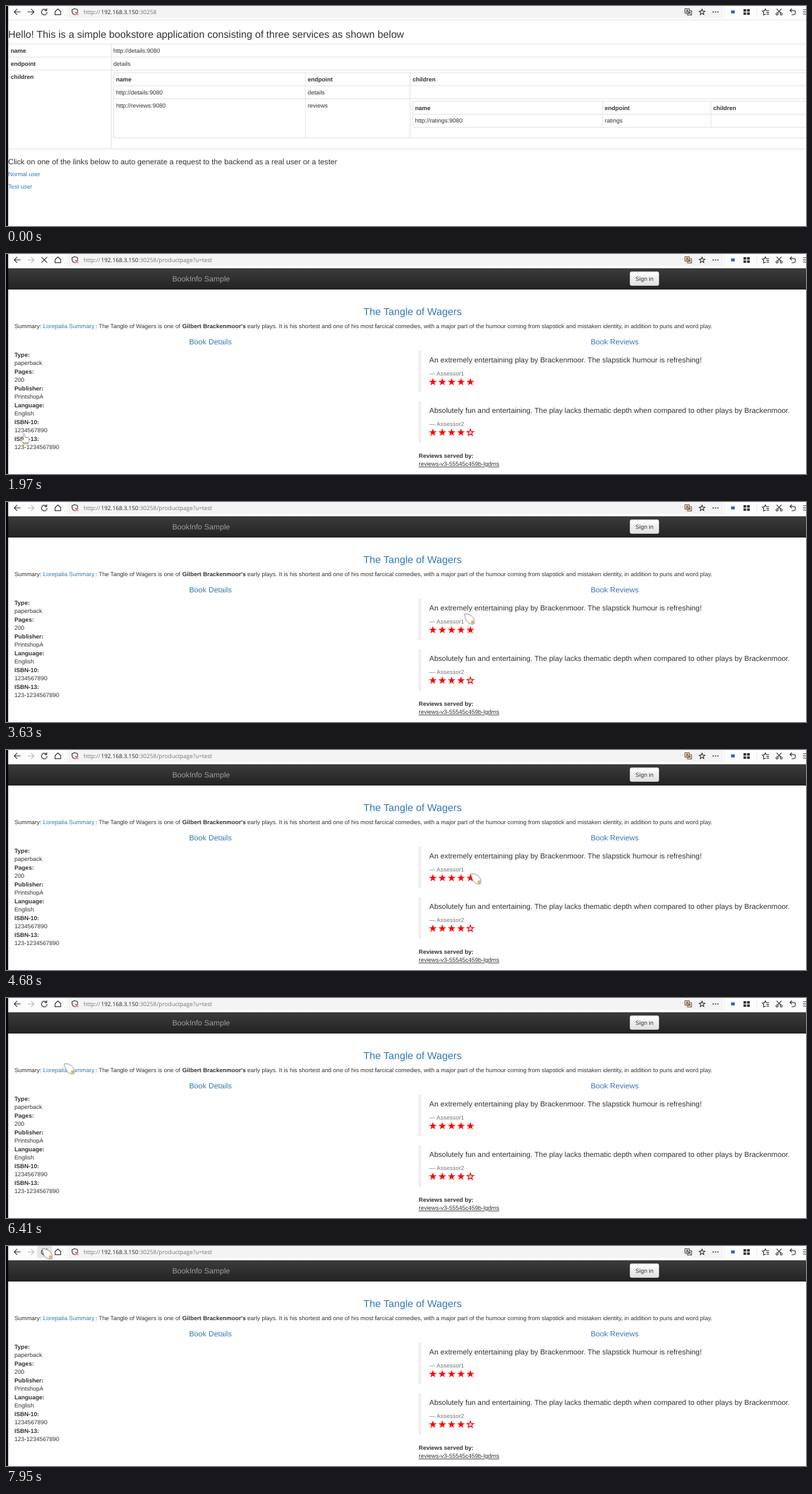
These frames come from a looping animation (1280x353 px, 8 s). An HTML page:

```html
<!DOCTYPE html>
<html lang="en">
<head>
<meta charset="utf-8">
<title>Bookstore walkthrough</title>
<style>
  html, body { margin: 0; width: 100%; height: 100%; overflow: hidden; background: #fff; }
  svg { display: block; }
  text {
    font: 9.47px "Liberation Sans", Arial, sans-serif;
    fill: #333; white-space: pre; text-rendering: geometricPrecision;
  }
  .h3 { font-size: 16.18px; }
  .h4 { font-size: 12.14px; }
  .quote { font-size: 11.79px; }
  .bold { font-weight: bold; }
  .link { fill: #337ab7; }
  .muted { fill: #777; }
  .brand { fill: #9d9d9d; }
  .under { text-decoration: underline; }
  .url text { font: 9.2px "Open Sans", "Noto Sans", sans-serif; fill: #777; }
  .url .host { fill: #222; }
  .grid { fill: none; stroke: #ddd; stroke-width: .9; }
  .icons { fill: none; stroke: #333; stroke-width: 1.2; stroke-linecap: round; stroke-linejoin: round; }

  /* one loop = 8 s, so 1% = 80 ms */
  .cut { animation: 8s step-end infinite; }
  .home { animation-name: home; }
  .product { animation-name: product; }
  .loading { animation-name: loading; }
  .idle { animation-name: idle; }
  .forward { animation-name: forward; }
  .translate { animation-name: translate; }
  .hover { animation-name: hover; }
  .test { animation-name: test; }
  .hand { animation-name: hand; }
  .arrow { animation-name: arrow; }
  .pointer { animation: travel 8s linear infinite; }

  @keyframes home { 0% { visibility: visible } 21.375%, 100% { visibility: hidden } }
  @keyframes product { 0% { visibility: hidden } 21.375%, 100% { visibility: visible } }
  @keyframes loading { 0% { visibility: hidden } 21.375% { visibility: visible } 29%, 100% { visibility: hidden } }
  @keyframes idle { 0% { visibility: visible } 21.375% { visibility: hidden } 29%, 100% { visibility: visible } }
  @keyframes forward { 0% { stroke: #333 } 21.375%, 100% { stroke: #bbb } }
  @keyframes translate { 0% { stroke: #444; fill: #ddd } 21.375% { stroke: #6b5138; fill: #e3d3c0 } 96.75%, 100% { stroke: #444; fill: #ddd } }
  @keyframes hover { 0% { visibility: hidden } 90%, 100% { visibility: visible } }
  @keyframes test { 0% { fill: #337ab7; text-decoration: none } 12.875%, 100% { fill: #23527c; text-decoration: underline } }
  @keyframes hand { 0% { visibility: hidden } 12.875% { visibility: visible } 25.5%, 100% { visibility: hidden } }
  @keyframes arrow { 0% { visibility: visible } 12.875% { visibility: hidden } 25.5%, 100% { visibility: visible } }
  @keyframes travel {
    0%, 1.62% { transform: translate(1300px, 300px) }
    1.625% { transform: translate(1262px, 268px) }
    3.75% { transform: translate(1060px, 272px) }
    6.875% { transform: translate(520px, 320px) }
    8.125% { transform: translate(335px, 328px) }
    10% { transform: translate(80px, 310px) }
    11.125% { transform: translate(36px, 295px) }
    14.625%, 25.5% { transform: translate(27px, 288px) }
    28.125% { transform: translate(220px, 262px) }
    30.625% { transform: translate(482px, 222px) }
    41% { transform: translate(661px, 203px) }
    45.375% { transform: translate(732px, 179px) }
    48.75% { transform: translate(870px, 150px) }
    51.5% { transform: translate(955px, 130px) }
    53.1% { transform: translate(979px, 140px) }
    58.5% { transform: translate(743px, 198px) }
    62%, 66.375% { transform: translate(736px, 204px) }
    71.25% { transform: translate(790px, 300px) }
    72.5% { transform: translate(808px, 318px) }
    75.875% { transform: translate(811px, 267px) }
    77.5% { transform: translate(912px, 200px) }
    80.125% { transform: translate(93px, 105px) }
    82% { transform: translate(5px, 70px) }
    86.25% { transform: translate(49px, 21px) }
    90% { transform: translate(62px, 8px) }
    92.5%, 100% { transform: translate(57px, 4px) }
  }
</style>
</head>
<body>
<svg width="1280" height="353" viewBox="0 0 1280 353">
  <defs>
    <linearGradient id="bar" x2="0" y2="1"><stop stop-color="#3c3c3c"/><stop offset="1" stop-color="#222"/></linearGradient>
    <linearGradient id="button" x2="0" y2="1"><stop stop-color="#fff"/><stop offset="1" stop-color="#e0e0e0"/></linearGradient>
    <path id="star" d="M0-6.4 1.5-2H6.2L2.4.8 3.8 5.3 0 2.5-3.8 5.3-2.4.8-6.2-2H-1.5Z"/>
  </defs>
  <rect width="1280" height="353" fill="#fff"/>

  <g class="home cut">
    <path class="grid" d="M3 61.1H1280M3 82H1280M3 102.9H1280M3 229.2H1280M168.3 61V229
      M1280 107H172.3V211.7H1280M172 127.9H1280M172 148.8H1280M478.9 107V211.7M646.6 107V211.7
      M1280 152.8H650.8V194.6H1280M651 173.7H1280M954.8 153V194.6M1127.8 153V194.6"/>
    <text class="h3" x="3.4" y="50.7">Hello! This is a simple bookstore application consisting of three services as shown below</text>
    <g class="bold">
      <text class="bold" x="7.5" y="74.8">name</text>
      <text class="bold" x="7.5" y="95.7">endpoint</text>
      <text class="bold" x="7.5" y="116.6">children</text>
      <text class="bold" x="176" y="120.7">name</text>
      <text class="bold" x="482.7" y="120.7">endpoint</text>
      <text class="bold" x="650.4" y="120.7">children</text>
      <text class="bold" x="654.5" y="166.5">name</text>
      <text class="bold" x="958" y="166.5">endpoint</text>
      <text class="bold" x="1131.5" y="166.5">children</text>
    </g>
    <text x="171.8" y="74.8">http://details:9080</text>
    <text x="171.8" y="95.7">details</text>
    <text x="176" y="141.6">http://details:9080</text>
    <text x="482.7" y="141.6">details</text>
    <text x="176" y="162.5">http://reviews:9080</text>
    <text x="482.7" y="162.5">reviews</text>
    <text x="654.5" y="187.4">http://ratings:9080</text>
    <text x="958" y="187.4">ratings</text>
    <text class="h4" x="3.4" y="253.6">Click on one of the links below to auto generate a request to the backend as a real user or a tester</text>
    <text class="link" x="3.4" y="272.9">Normal user</text>
    <text class="link test cut" x="3.4" y="293.1">Test user</text>
  </g>

  <g class="product cut">
    <rect y="23" width="1280" height="34" fill="url(#bar)"/>
    <text class="h4 brand" x="266" y="44">BookInfo Sample</text>
    <rect x="998.5" y="28.5" width="46" height="22" rx="2.5" fill="url(#button)" stroke="#ccc"/>
    <text x="1007" y="43">Sign in</text>

    <text class="h3 link" x="650.5" y="98.3" text-anchor="middle">The Tangle of Wagers</text>
    <text x="13.5" y="118.5">Summary: <tspan class="link">Lorepalia Summary</tspan></text>
    <text x="278.8" y="118.5" text-anchor="end">: The Tangle of Wagers is one of</text>
    <text class="bold" x="282" y="118.5">Gilbert Brackenmoor's</text>
    <text x="386" y="118.5">early plays. It is his shortest and one of his most farcical comedies, with a major part of the humour coming from slapstick and mistaken identity, in addition to puns and word play.</text>
    <text class="h4 link" x="293" y="145.4">Book Details</text>
    <text class="h4 link" x="935.5" y="145.4">Book Reviews</text>
    <g id="details"></g>

    <path d="M660 155h4v67h-4zM660 236h4v67h-4z" fill="#eee"/>
    <text class="quote" x="677.3" y="174">An extremely entertaining play by Brackenmoor. The slapstick humour is refreshing!</text>
    <text class="muted" x="677.3" y="195.3">— Assessor1</text>
    <text class="quote" x="677.3" y="255">Absolutely fun and entertaining. The play lacks thematic depth when compared to other plays by Brackenmoor.</text>
    <text class="muted" x="677.3" y="276.3">— Assessor2</text>
    <g id="stars" fill="red" stroke="red"></g>
    <text class="bold" x="660.3" y="326.8">Reviews served by:</text>
    <text class="under" x="660.3" y="340.3">reviews-v3-55545c459b-lgdms</text>
  </g>

  <!-- browser toolbar -->
  <rect width="1280" height="22" fill="#fcfcfc"/>
  <rect x="98" width="1049" height="19" fill="#f4f4f4"/>
  <path d="M0 22.5H1280" stroke="#e8e8e8"/>
  <rect class="hover cut" x="50" width="24" height="19" rx="2" fill="#e5e5e5"/>
  <g class="icons">
    <path d="M23 9.5H13.5M17.5 5.2 13.2 9.5 17.5 13.8"/>
    <path class="forward cut" d="M35 9.5H44.5M40.5 5.2 44.8 9.5 40.5 13.8"/>
    <path class="idle cut" d="M64.8 7A4.5 4.5 0 1 0 65.7 10M65.2 4.3V7.3H62.2"/>
    <path class="loading cut" d="M57 5.2 65.5 13.7M65.5 5.2 57 13.7"/>
    <path d="M78.5 9 83 4.8 87.5 9V13.8H78.5Z"/>
    <path d="M110 4.2 114.3 5.7V9M105.7 5.7 110 4.2M105.7 5.7V9.5Q106 12.5 109.5 14"/>
    <path d="M111 10 115 14M115 10 111 14" stroke="#b33"/>
    <g class="translate cut" stroke-width="1">
      <rect x="1086.5" y="4.5" width="7" height="7"/>
      <path d="M1088.3 10 1090 6 1091.8 10M1089 8.8H1091.2"/>
      <path d="M1094 7.5H1097V14.5H1090V12M1092 12.8 1096 9.5M1092.5 10 1096 13" fill="none"/>
    </g>
    <use href="#star" transform="translate(1113.7 9.8) scale(.8)" stroke-width="1.4"/>
    <g fill="#333" stroke="none">
      <circle cx="1131.5" cy="9.5" r="1.1"/><circle cx="1135.3" cy="9.5" r="1.1"/><circle cx="1139.1" cy="9.5" r="1.1"/>
      <path d="M1180 5h4.3v4h-4.3zM1185.7 5h4.3v4h-4.3zM1180 10.2h4.3v4h-4.3zM1185.7 10.2h4.3v4h-4.3z"/>
    </g>
    <path d="M1149.5 3V16M1201.5 3V16" stroke="#eee"/>
    <rect x="1160" y="7" width="6" height="5" fill="#3d6fb5" stroke="none"/>
    <path d="M1215 13.2 1212 14.5 1212.5 10.8 1210 8.2 1213.3 7.6 1215 4.5 1216.5 7.5H1220.5M1217 10.3H1220.5M1217 13.2H1220.5"/>
    <path d="M1233.5 4.8 1239.5 11.2M1240.5 4.8 1234.5 11.2"/>
    <circle cx="1233.7" cy="12.7" r="1.7"/><circle cx="1240.3" cy="12.7" r="1.7"/>
    <path d="M1257 4.5 1254.3 7.2 1257 9.9M1254.5 7.2H1260A3.2 3.2 0 0 1 1260 13.8H1257.5M1275.5 6H1280M1275.5 9.5H1280M1275.5 13H1280"/>
  </g>
  <g class="url">
    <text x="124" y="13">http://</text>
    <text class="host" x="152" y="13">192.168.3.150</text>
    <text x="212" y="13">:30258</text>
    <text class="product cut" x="241" y="13">/productpage?u=test</text>
  </g>

  <rect width="3.4" height="353" fill="#000"/>

  <g class="pointer" fill="#fff" stroke="#777" stroke-width=".9" stroke-linejoin="round">
    <g class="arrow cut">
      <path d="M.6 1C6-.4 12 2 15.3 7.5 17.3 11 17.6 14.5 15.5 17 11 17.5 6.5 15.5 4 11 2.2 7.5 1.8 4 .6 1Z"/>
      <circle cx="14" cy="13.7" r="2.6" fill="#e0b96a" stroke="none"/>
    </g>
    <g class="hand cut" stroke="#8a8a8a">
      <path d="M.5 1.2Q1.8-.5 3 1.2L3.6 6.2Q5 5 6 6.5 7.6 5.5 8.3 7.2 10 6.7 10 9V12.5L8.5 15.2H.5L-3.5 9.8Q-3.3 7.7-1.3 9L.8 10.6Z"/>
      <path d="M.5 14.8H8.5V17H.5Z" fill="#e8d2a4" stroke="#b59a62"/>
    </g>
  </g>
</svg>
<script>
  const draw = (parent, name, attrs, text = '') => {
    const node = document.createElementNS('http://www.w3.org/2000/svg', name);
    for (const key in attrs) node.setAttribute(key, attrs[key]);
    node.textContent = text;
    document.getElementById(parent).append(node);
  };

  const details = ['Type:', 'paperback', 'Pages:', '200', 'Publisher:', 'PrintshopA',
    'Language:', 'English', 'ISBN-10:', '1234567890', 'ISBN-13:', '123-1234567890'];
  details.forEach((line, i) =>
    draw('details', 'text', { x: 13.5, y: 165 + i * 13.49, class: i % 2 ? '' : 'bold' }, line));

  [[205.5, 5], [286.5, 4]].forEach(([y, rating]) => {
    for (let i = 0; i < 5; i++) {
      const full = i < rating;
      draw('stars', 'use', {
        href: '#star',
        transform: `translate(${683 + i * 15} ${y}) scale(${full ? 1 : 0.86})`,
        fill: full ? 'red' : 'none',
        'stroke-width': full ? 0 : 1.4
      });
    }
  });
</script>
</body>
</html>
```
